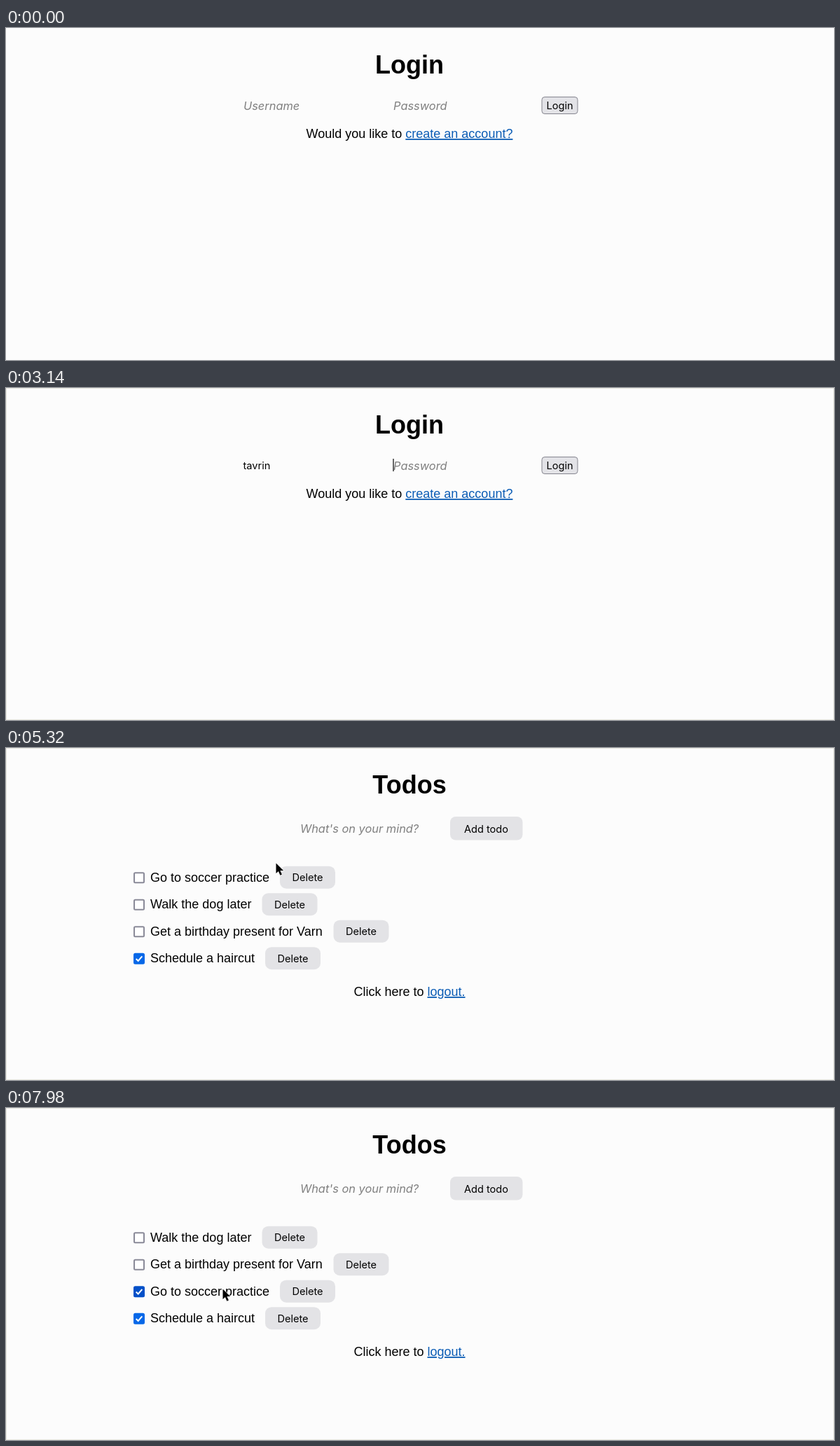
These frames come from a looping animation (1182x474 px, 8000 ms). An HTML page:

```html
<!DOCTYPE html>
<html lang="en">
<head>
<meta charset="utf-8">
<title>Todo login</title>
<style>
  html, body { margin: 0; width: 100%; height: 100%; overflow: hidden; background: #fcfcfc; }
  svg { display: block; width: 1182px; height: 474px; }
  text { font: 18px "Liberation Sans", Arial, sans-serif; white-space: pre; }
  .title { font-size: 36px; font-weight: bold; text-anchor: middle; }
  .mid { text-anchor: middle; }
  .ui { font: 14.6px Inter, sans-serif; }
  .hint { font: italic 16.4px Inter, sans-serif; fill: #808080; }
  .link { fill: #0b5cb5; text-decoration: underline; }
  .button { fill: #e3e3e6; }
</style>
</head>
<body>
<svg viewBox="0 0 1182 474">
  <rect id="frame" x=".5" y=".5" width="1181" height="473" fill="none" stroke="#e8e8e0"/>
  <g id="login">
    <text class="title" x="576" y="65">Login</text>
    <text id="userHint" class="hint" x="339" y="116.5">Username</text>
    <text id="user" class="ui" x="338.5" y="116"></text>
    <text id="passHint" class="hint" x="553" y="116.5">Password</text>
    <g id="dots"></g>
    <rect x="765" y="98.5" width="51" height="24" rx="4" fill="#e3e3e7" stroke="#85858f"/>
    <text class="ui mid" x="790.5" y="116">Login</text>
    <text class="mid" x="576" y="157">Would you like to <tspan class="link">create an account?</tspan></text>
    <path id="caret" d="M0 101v18" stroke="#000" stroke-width="1.2"/>
  </g>
  <g id="todos">
    <text class="title" x="576" y="65">Todos</text>
    <text class="hint" x="420" y="121">What's on your mind?</text>
    <rect class="button" x="634" y="98" width="103.5" height="33.5" rx="8"/>
    <text class="ui mid" x="685.5" y="120.5">Add todo</text>
    <g id="list"></g>
    <text class="mid" x="576" y="354">Click here to <tspan class="link">logout.</tspan></text>
  </g>
  <path id="arrow" d="M0 0v14.6l3.4-3.2 2.5 5.8 2.5-1.1-2.5-5.6h4.7z" stroke="#fff" stroke-width="1.2" paint-order="stroke"/>
  <path id="beam" d="M-4-9q4 0 4 3v12q0 3-4 3M4-9q-4 0-4 3v12q0 3 4 3M-2 2h4" fill="none" stroke="#000" stroke-width="1.4"/>
</svg>
<script>
const LOOP = 8000, ROW_TOP = 185, ROW_STEP = 38.5;
const USER = "tavrin";
const T = { focus: 1120, type: 1600, tab: 2760, submit: 4520, point: 4800, check: 6400 };
const PASS_TIMES = [3560, 3760, 4080];
const LOGIN_PATH = [[60, 620, 490], [800, 414, 110], [920, 409.5, 110.5]];
const TODO_PATH = [[T.point, 409, 108], [5320, 385, 164], [5900, 338, 181],
                   [6860, 334, 179], [7100, 333, 181], [7850, 309, 258]];
const $ = id => document.getElementById(id);
const show = (id, on) => $(id).setAttribute("display", on ? "inline" : "none");
const move = (el, x, y) => el.setAttribute("transform", `translate(${x} ${y})`);

$("dots").innerHTML = PASS_TIMES.map((_, i) => `<circle cx="${556.5 + 7 * i}" cy="110.5" r="2.6"/>`).join("");

const todos = [
  ["Go to soccer practice", 391],
  ["Walk the dog later", 365.5],
  ["Get a birthday present for Varn", 467.5],
  ["Schedule a haircut", 370]
].map(([label, x]) => {
  const row = document.createElementNS("http://www.w3.org/2000/svg", "g");
  row.innerHTML = `<rect class="box" x="183" y="-6.5" width="14" height="14" rx="1.5" stroke-width="2"/>
    <path class="tick" d="M185.7.8l3 3 5.6-6.6" fill="none" stroke="#fff" stroke-width="2"/>
    <text x="206" y="5.8">${label}</text>
    <rect class="button" x="${x}" y="-16" width="79" height="32" rx="9"/>
    <text class="ui mid" x="${x + 39.5}" y="5.3">Delete</text>`;
  $("list").append(row);
  return row;
});

function along(path, t) {
  const next = path.findIndex(p => p[0] > t);
  if (next < 0) return path.at(-1).slice(1);
  if (next === 0) return path[0].slice(1);
  const a = path[next - 1], b = path[next];
  const u = (t - a[0]) / (b[0] - a[0]), e = u * u * (3 - 2 * u);
  return [a[1] + (b[1] - a[1]) * e, a[2] + (b[2] - a[2]) * e];
}

function drawLogin(t) {
  const typed = Math.max(0, Math.min(USER.length, Math.floor((t - T.type) / 180) + 1));
  const dots = PASS_TIMES.filter(at => t >= at).length;
  $("user").textContent = USER.slice(0, typed);
  show("userHint", !typed);
  show("passHint", !dots);
  [...$("dots").children].forEach((dot, i) => dot.setAttribute("visibility", i < dots ? "visible" : "hidden"));
  show("caret", t >= T.focus);
  const userEnd = 339 + (typed ? $("user").getComputedTextLength() : 0);
  move($("caret"), t < T.tab ? userEnd : 553 + 7 * dots, 0);
}

function drawTodos(t, x, y) {
  const dragged = t < 7000 ? 0 : Math.min(2, Math.max(0, Math.round((y - ROW_TOP) / ROW_STEP)));
  const hovered = Math.round((y - ROW_TOP) / ROW_STEP);
  todos.forEach((row, i) => {
    const slot = i === 0 ? dragged : i <= dragged ? i - 1 : i;
    const checked = i === 3 || (i === 0 && t >= T.check);
    const over = t >= T.point && slot === hovered && x < 377;
    const color = checked ? (over ? "#0250c8" : "#0668e8") : (over ? "#676774" : "#8a8a98");
    const box = row.querySelector(".box");
    box.setAttribute("stroke", color);
    box.setAttribute("fill", checked ? color : "#fff");
    row.querySelector(".tick").setAttribute("visibility", checked ? "visible" : "hidden");
    move(row, 0, ROW_TOP + ROW_STEP * slot - .3);
  });
}

function draw(now) {
  const t = now % LOOP, loggedIn = t >= T.submit;
  const [x, y] = along(loggedIn ? TODO_PATH : LOGIN_PATH, t);
  const visible = loggedIn ? t >= T.point : t >= 60 && t < T.type;
  const overInput = !loggedIn && x < 540 && y > 98 && y < 123;
  show("frame", t >= T.focus);
  show("login", !loggedIn);
  show("todos", loggedIn);
  loggedIn ? drawTodos(t, x, y) : drawLogin(t);
  show("arrow", visible && !overInput);
  show("beam", visible && overInput);
  move($("arrow"), x + .5, y + .5);
  move($("beam"), x, y);
  requestAnimationFrame(() => draw(performance.now()));
}
draw(0);
</script>
</body>
</html>
```
